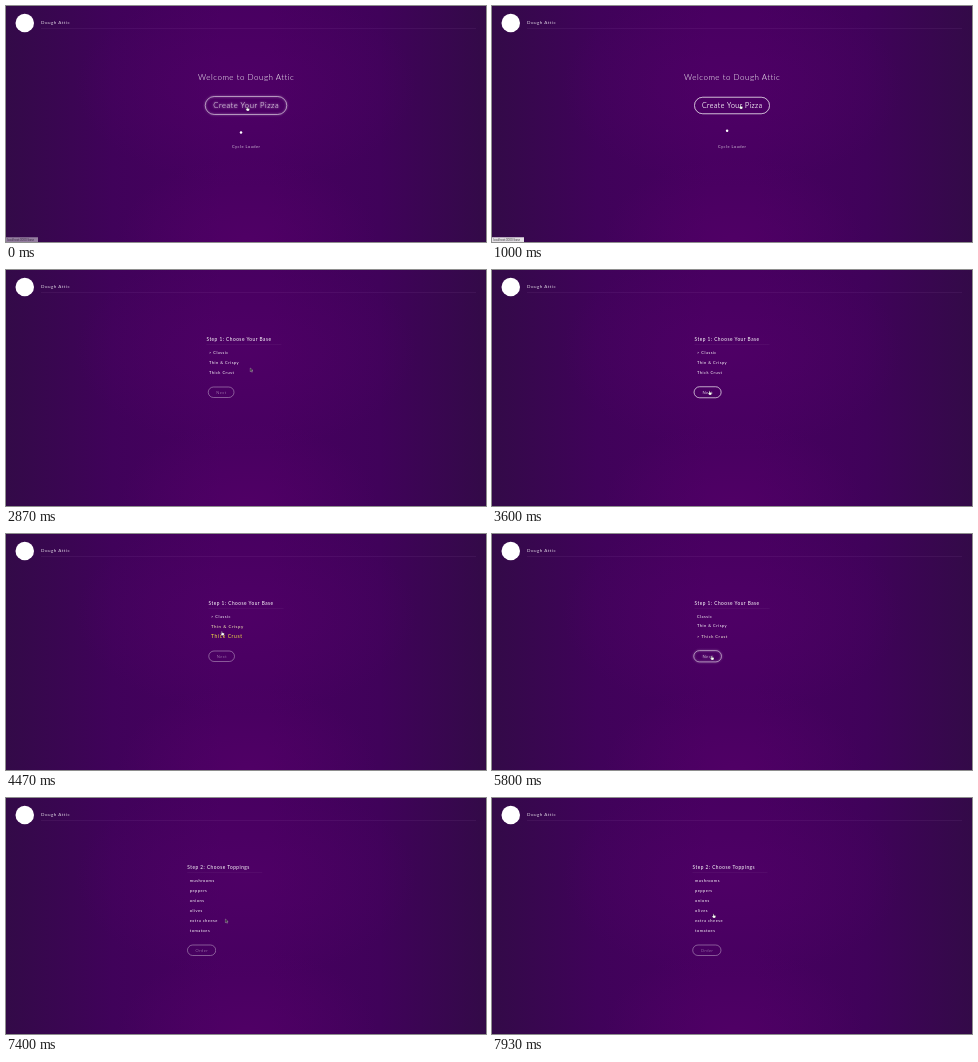
An HTML page for the animation above (8000 ms loop, 480 by 236 pixels).

```html
<!DOCTYPE html>
<html lang="en">
<head>
<meta charset="utf-8">
<title>Pizza order</title>
<style>
  html, body { margin: 0; width: 100%; height: 100%; overflow: hidden; }
  body {
    background:
      radial-gradient(ellipse 130px 85px at 242px 236px, #57006a88, #57006a00),
      radial-gradient(ellipse 170px 100px at 240px 80px, #54006a88, #54006a00),
      linear-gradient(90deg, #330a48, #40025a 22%, #470060 45%, #470060 55%, #40025a 78%, #330a48);
  }
  svg { display: block; width: 100%; height: 100%; }
  text { font-family: Lato, sans-serif; letter-spacing: 2px; fill: #fff; }
  .mid { text-anchor: middle; }
  .light { font-weight: 300; }
</style>
</head>
<body>
<svg viewBox="0 0 1920 944">
  <circle cx="75" cy="68" r="37" fill="#fff"/>
  <text x="140" y="73" font-size="18" opacity=".85">Dough Attic</text>
  <path d="M140 90H1880" stroke="#e6b0ff" stroke-opacity=".06" stroke-width="4"/>

  <g id="home">
    <text class="mid light" x="961" y="296" font-size="32">Welcome to Dough Attic</text>
    <g id="create"></g>
    <circle id="dot" r="5" fill="#fff"/>
    <text class="mid" x="961" y="567" font-size="16" opacity=".75">Cycle Loader</text>
  </g>
  <g id="base"></g>
  <g id="toppings"></g>

  <g id="status">
    <rect y="925" width="128" height="19" fill="#e4e0e6"/>
    <text id="link" x="5" y="939" font-size="12" style="fill:#444;letter-spacing:0"></text>
  </g>
  <path id="arrow" d="M0 0V15L4 11L6 17L9 16L6 10H11Z" fill="#222" stroke="#fff" stroke-opacity=".7" stroke-width="1.5"/>
  <path id="hand" d="M0 0Q2 -2 3 1V5L11 7Q12 13 8 16H1L-4 9Q-2 6 0 9Z" fill="#fff" stroke="#222" stroke-width="1"/>
</svg>
<script>
const LOOP = 8000, VW = 1920;
const $ = id => document.getElementById(id);

const buttonMarkup = (x, y, w, h, label, size) =>
  `<rect x="${x}" y="${y}" width="${w}" height="${h}" rx="${h / 2}" fill="none" stroke="#fff" stroke-width="2"/>
   <text class="mid light" x="${x + w / 2 + 1}" y="${y + h / 2 + size * .36}" font-size="${size}">${label}</text>`;

const stepMarkup = (title, items, button) =>
  `<text x="810" y="283" font-size="19">${title}</text>
   <path d="M810 298H1110" stroke="#fff" stroke-opacity=".04" stroke-width="4"/>` +
  items.map((item, i) => `<text class="item" y="${334 + 40 * i}" x="820" font-size="16">${item}</text>`).join('') +
  button;

const bases = ['Classic', 'Thin & Crispy', 'Thick Crust'];
const extras = ['mushrooms', 'peppers', 'onions', 'olives', 'extra cheese', 'tomatoes'];
$('create').innerHTML = buttonMarkup(810, 365, 300, 66, 'Create Your Pizza', 28);
$('base').innerHTML = stepMarkup('Step 1: Choose Your Base', bases.map(b => b.replace('&', '&amp;')),
  `<g id="next">${buttonMarkup(811, 468, 103, 42, 'Next', 16)}</g>`);
$('toppings').innerHTML = stepMarkup('Step 2: Choose Toppings', extras,
  `<g opacity=".7">${buttonMarkup(811, 588, 113, 42, 'Order', 16)}</g>`);
const baseItems = $('base').querySelectorAll('.item');

const clamp = v => Math.min(1, Math.max(0, v));
const ramp = (t, from, to) => clamp((t - from) / (to - from));

// cubic-bezier(a, 0, .58, 1)
function ease(p, a = .42) {
  let lo = 0, hi = 1, s;
  for (let i = 0; i < 20; i++) {
    s = (lo + hi) / 2;
    const x = 3 * a * s * (1 - s) ** 2 + 1.74 * s * s * (1 - s) + s ** 3;
    if (x < p) lo = s; else hi = s;
  }
  return 3 * s * s * (1 - s) + s ** 3;
}

// ping-pong between 0 and 1, each leg lasting `leg` ms
function yoyo(t, leg, a) {
  const p = t / leg % 2;
  return ease(p < 1 ? p : 2 - p, a);
}

// remaining distance (1 to 0) of a spring with mass 1 and damping 10
function spring(ms, stiffness) {
  if (ms <= 0) return 1;
  const s = ms / 1000, w = Math.sqrt(stiffness - 25);
  return Math.exp(-5 * s) * (Math.cos(w * s) + 5 / w * Math.sin(w * s));
}

const hover = (t, from, to) =>
  t < from ? 0 : t < to ? 1 - spring(t - from, 300) : spring(t - to, 300);

const exit = (t, start) => -VW * ease(ramp(t, start, start + 500));
const move = (id, x, y = 0) => $(id).setAttribute('transform', `translate(${x} ${y})`);

function scaleAbout(node, cx, cy, k, dx = 0) {
  node.setAttribute('transform', `translate(${cx + dx} ${cy}) scale(${k}) translate(${-cx} ${-cy})`);
}

function glowButton(id, cx, cy, amount, dx) {
  scaleAbout($(id), cx, cy, 1 + .1 * amount, dx);
  $(id).style.filter = amount > .01 ? `drop-shadow(0 0 ${4 * amount}px #fffb)` : 'none';
}

// time, x, y of the pointer
const path = [
  [0, 963, 404], [800, 992, 396], [1400, 992, 396], [1670, 977, 392], [3270, 977, 392],
  [3500, 868, 484], [3800, 868, 484], [4030, 862, 364], [4300, 862, 370], [4470, 862, 390],
  [4650, 864, 406], [5350, 864, 406], [5600, 877, 488], [6000, 877, 488], [6500, 877, 486],
  [7300, 877, 486], [7800, 884, 464], [LOOP, 884, 464]
];
const overLinks = [[0, 1400], [3450, 3880], [3990, 6150], [7600, LOOP]];

function drawPointer(t) {
  const i = path.findIndex(p => p[0] > t);
  const [t0, x0, y0] = path[i - 1], [t1, x1, y1] = path[i];
  const k = ease(ramp(t, t0, t1));
  const isHand = overLinks.some(([a, b]) => t >= a && t < b);
  for (const id of ['arrow', 'hand']) move(id, x0 + (x1 - x0) * k, y0 + (y1 - y0) * k);
  $('arrow').style.display = isHand ? 'none' : '';
  $('hand').style.display = isHand ? '' : 'none';
}

function drawHome(t) {
  move('home', exit(t, 1275));
  glowButton('create', 960, 398, yoyo(t + 225, 300));
  const swing = t * 1.035;
  $('dot').setAttribute('cx', 940 + 40 * yoyo(swing, 500));
  $('dot').setAttribute('cy', 506 - 30 * yoyo(swing, 250, 0));
}

function drawBase(t) {
  const mounted = 1775;
  $('base').style.display = t < mounted ? 'none' : '';
  move('base', VW * spring(t - mounted - 500, 100) + exit(t, 5865));
  const chosen = t < 5050 ? 0 : 2;
  const hovers = [0, hover(t, 3990, 4385), hover(t, 4377, 5450)];
  baseItems.forEach((node, i) => {
    const h = hovers[i], c = clamp(h);
    node.textContent = (i === chosen ? '> ' : '') + bases[i];
    node.style.fill = `rgb(${255 - 7 * c}, ${255 - 30 * c}, ${255 - 237 * c})`;
    scaleAbout(node, 820, 329 + 40 * i, 1 + .3 * h);
  });
  const glow = t >= 5600 ? yoyo(t - 5600, 300)
    : t >= 3450 ? yoyo(Math.min(t, 3850) - 3450, 300) * (1 - ramp(t, 3850, 4000)) : 0;
  glowButton('next', 862, 489, glow, -VW * spring(t - mounted, 120));
  $('next').style.opacity = .7 + .3 * glow;
}

function drawStatus(t) {
  const first = t < 3000;
  $('link').textContent = 'localhost:3000/' + (first ? 'base' : 'toppings');
  $('status').style.opacity = first
    ? ramp(t, -120, 100) * (1 - ramp(t, 1830, 2000))
    : ramp(t, 5840, 6000) * (1 - ramp(t, 6400, 6580));
}

function frame(now) {
  const t = now % LOOP;
  drawHome(t);
  drawBase(t);
  move('toppings', VW * spring(t - 6865, 100));
  drawStatus(t);
  drawPointer(t);
  requestAnimationFrame(frame);
}
requestAnimationFrame(frame);
</script>
</body>
</html>
```
